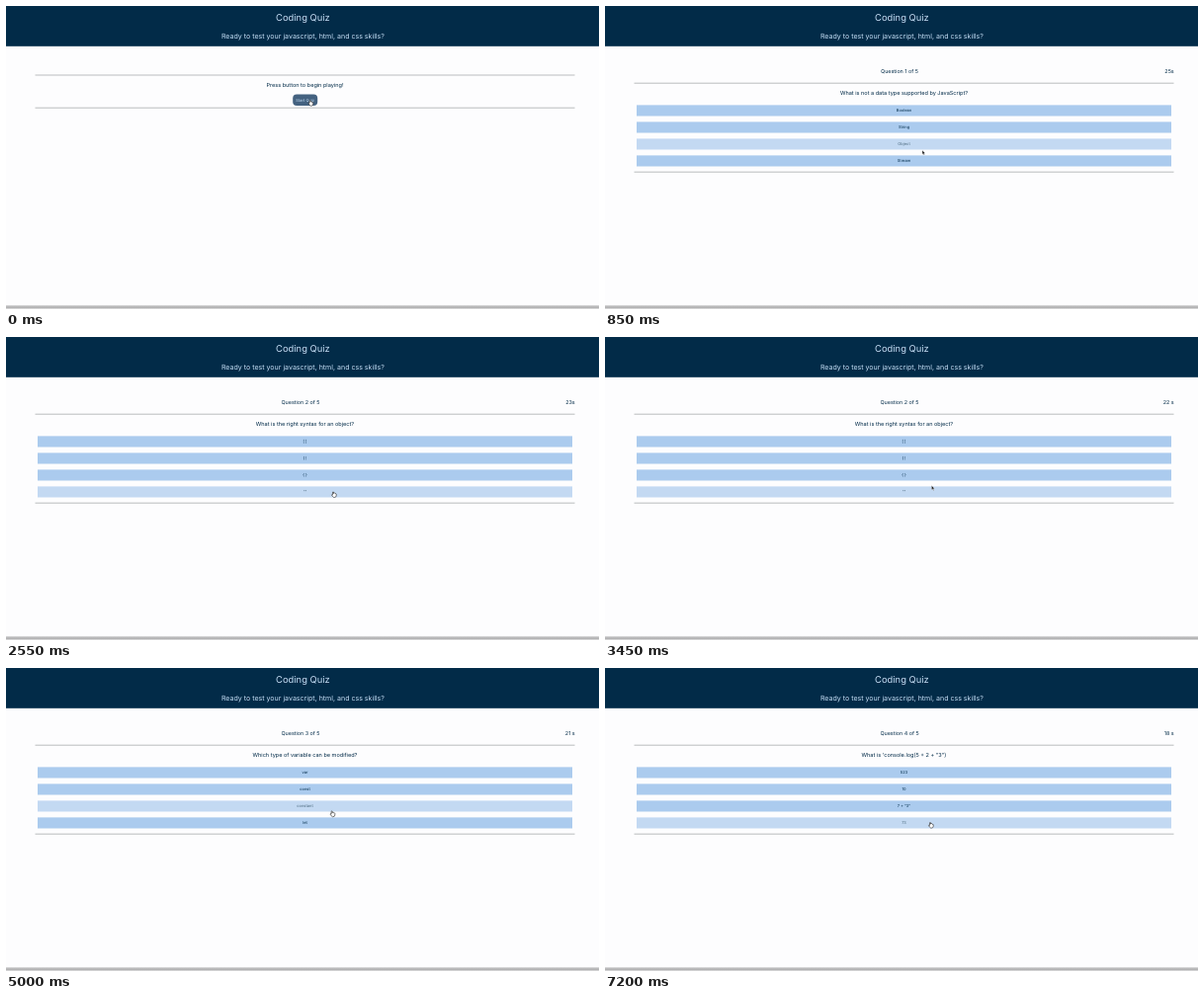
These frames come from a looping animation (600x307 px, 8 s). An HTML page:

```html
<!DOCTYPE html>
<html lang="en">
<head>
<meta charset="utf-8">
<title>Coding Quiz</title>
<style>
  html, body { margin: 0; width: 100%; height: 100%; overflow: hidden; background: #fdfdfe; }
  svg { display: block; width: 100%; height: 100%; }
  text { font-family: Inter, "Open Sans", sans-serif; font-size: 5.55px; fill: #022b48;
         text-anchor: middle; text-rendering: geometricPrecision; }
  .head { fill: #c9e0f7; }
  .small { font-size: 4px; }
  .rule { stroke: #a9abae; stroke-width: .8; }
  .option rect { fill: #abcbee; }
  .option.hover { opacity: .7; }
</style>
</head>
<body>
<svg viewBox="0 0 600 307">
  <defs>
    <linearGradient id="edge" x2="0" y2="1">
      <stop offset="0" stop-color="#e4e4e5"/>
      <stop offset=".55" stop-color="#a9a9aa"/>
      <stop offset="1" stop-color="#dededf"/>
    </linearGradient>
  </defs>
  <rect width="600" height="307" fill="#fdfdfe"/>
  <rect width="600" height="40.8" fill="#022b48"/>
  <text class="head" x="300.4" y="15.3" style="font-size:9.4px">Coding Quiz</text>
  <text class="head" x="300.4" y="32.5" style="font-size:7.05px">Ready to test your javascript, html, and css skills?</text>
  <rect y="303" width="600" height="4" fill="url(#edge)"/>

  <g id="start">
    <path class="rule" d="M29.5 70H575.5M29.5 103.2H575.5"/>
    <text x="302.5" y="81.9">Press button to begin playing!</text>
    <rect x="290.2" y="89.5" width="25" height="11.4" rx="4" fill="#446280"/>
    <text class="small head" x="302.7" y="96.5">Start Quiz</text>
  </g>

  <g id="quiz">
    <path class="rule" d="M29.5 78.2H575.5M29.5 168.2H575.5"/>
    <text id="progress" x="298" y="68.4" style="font-size:5.4px"></text>
    <text id="timer" x="575.7" y="68.4" style="font-size:5.4px;text-anchor:end"></text>
    <text id="question" x="302.5" y="90.1"></text>
    <g id="options"></g>
  </g>

  <g id="cursor" stroke-linejoin="round">
    <path id="arrow" d="M0 0V4.2L1 3.3 1.7 4.9 2.4 4.6 1.7 3.1H3Z" fill="#111" stroke="#fff" stroke-width=".35"/>
    <path id="hand" d="M-.5 .3Q0-.3 .5 .3V1.8Q1-.1+1.9 1.6L2.1 2Q2.9 1.5 3.2 2.4V4Q3 5.7 1.4 5.7H.7Q-.4 5.2-1.6 3.1-1.2 2.3-.5 3.1Z"
          fill="#fff" stroke="#222" stroke-width=".6"/>
  </g>
</svg>
<script>
const LOOP = 8000, STEP = 50, QUIZ_START = 150;
const TOP = 100.4, PITCH = 17, HEIGHT = 11.1;
const $ = id => document.getElementById(id);

const questions = [
  { at: 0, title: "What is not a data type supported by JavaScript?", options: ["Boolean", "String", "Object", "Stream"] },
  { at: 2500, title: "What is the right syntax for an object?", options: ["[ ]", "( )", "{ }", '""'] },
  { at: 4650, title: "Which type of variable can be modified?", options: ["var", "const", "constant", "let"] },
  { at: 6950, title: "What is 'console.log(5 + 2 + \"3\")", options: ["523", "10", '7 + "3"', "73"] },
];
const ticks = [1200, 2200, 3200, 4150, 5200, 6200, 7200];

// Pointer tip: time, x, y
const path = [
  [0, 307.5, 95.5], [600, 307.5, 95.5], [700, 317, 112.8], [850, 321, 146.2],
  [1000, 325, 152], [1400, 331, 156.8], [3200, 331, 156.8], [3650, 330, 145.6],
  [3800, 329.6, 145], [5350, 329.6, 145], [5700, 329, 155.6], [5800, 329, 156.4], [LOOP, 329, 156.4],
];

const options = [0, 1, 2, 3].map(i => {
  const y = TOP + PITCH * i;
  $("options").insertAdjacentHTML("beforeend",
    `<g class="option"><rect x="32" y="${y}" width="541" height="${HEIGHT}"/>` +
    `<text class="small" x="302.5" y="${y + 6.9}"></text></g>`);
  return $("options").lastElementChild;
});

function pointerAt(t) {
  const i = Math.max(1, path.findIndex(p => p[0] >= t));
  const [t0, x0, y0] = path[i - 1], [t1, x1, y1] = path[i];
  const k = Math.max(0, (t - t0) / (t1 - t0));
  return [x0 + (x1 - x0) * k, y0 + (y1 - y0) * k];
}

const optionAt = y => options.findIndex((_, i) => y >= TOP + PITCH * i && y <= TOP + PITCH * i + HEIGHT);
const show = (id, on) => $(id).setAttribute("visibility", on ? "visible" : "hidden");

function draw(t) {
  const playing = t >= QUIZ_START;
  show("start", !playing);
  show("quiz", playing);

  const index = questions.findLastIndex(q => t >= q.at);
  const seconds = 25 - ticks.filter(at => t >= at).length;
  $("progress").textContent = `Question ${index + 1} of 5`;
  $("timer").textContent = seconds + (seconds > 22 ? "s" : " s");
  $("question").textContent = questions[index].title;

  // The highlight trails the pointer slightly
  const hovered = optionAt(pointerAt(Math.max(0, t - 40))[1]);
  options.forEach((g, i) => {
    g.lastElementChild.textContent = questions[index].options[i];
    g.classList.toggle("hover", i === hovered);
  });

  const [x, y] = pointerAt(t);
  const pointing = !playing || optionAt(y) >= 0;
  $("cursor").setAttribute("transform", `translate(${x} ${y})`);
  show("hand", pointing);
  show("arrow", !pointing);
}

function frame() {
  draw(Math.floor(performance.now() % LOOP / STEP) * STEP);
  requestAnimationFrame(frame);
}
frame();
</script>
</body>
</html>
```
